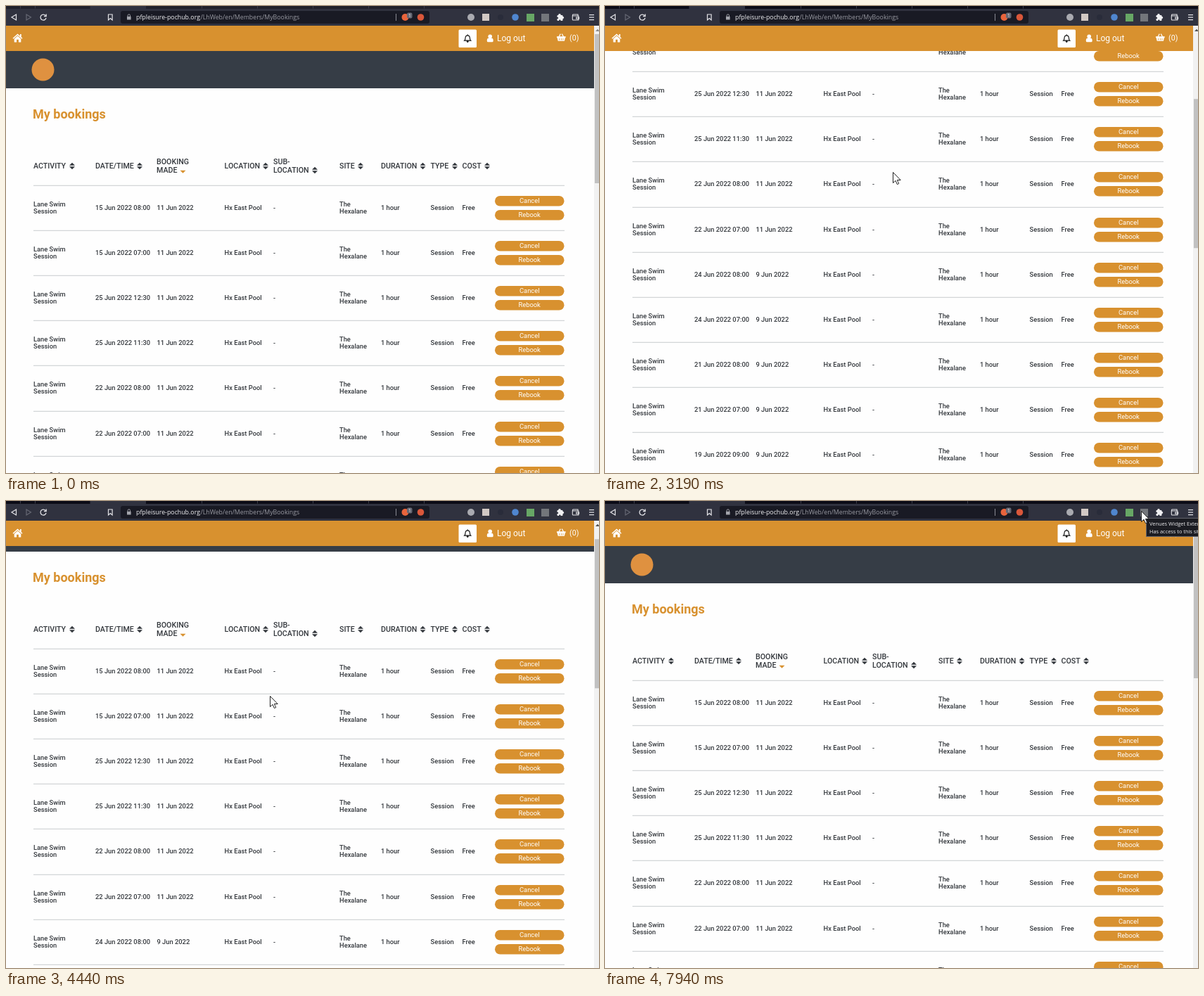
These frames come from a looping animation (843 px wide and 664 px high, 8 s). An HTML page with a canvas:

```html
<!DOCTYPE html>
<html lang="en">
<head>
<meta charset="utf-8">
<title>My bookings</title>
<style>
html, body { margin: 0; width: 843px; height: 664px; overflow: hidden; }
canvas { display: block; }
</style>
</head>
<body>
<canvas id="stage" width="843" height="664"></canvas>
<script>
const ctx = document.getElementById('stage').getContext('2d');
const LOOP = 8000, W = 843, H = 664, PAGE_W = 836;
const ORANGE = '#d8912f', INK = '#33373c', WHITE = '#fff';
const BODY = '500 9.33px Roboto, sans-serif';
const HEAD = '500 10.67px Roboto, sans-serif';

// time, pointer x, pointer y, scroll offset
const KEYS = [
  [310, 838, 655, 0], [620, 690, 330, 0], [930, 598, 141, 0], [1130, 598, 141, 0],
  [1500, 480, 115, 0], [1870, 404, 145, 0], [2020, 410, 180, 0], [2090, 410, 180, 0],
  [2700, 413, 229, 184], [2765, 413, 229, 184], [2775, 413, 230, 190], [2930, 413, 230, 190],
  [3190, 409, 236, 290], [3255, 409, 236, 290], [3500, 405, 260, 330], [3690, 402, 280, 300],
  [4090, 397, 306, 164], [4155, 397, 306, 164], [4510, 370, 270, 16], [4800, 330, 220, 0],
  [5350, 262, 133, 0], [5630, 400, 156, 0], [5695, 400, 156, 0], [6120, 629, 150, 0],
  [6520, 629, 150, 0], [6900, 805, 80, 0], [7060, 823, 28, 0], [7180, 795, 8, 0],
  [7270, 764, 15, 0], [7410, 762, 14, 0]
];
const FOCUS_AT = 1200, TOOLTIP_AT = 7940;

const SLOTS = ['15 Jun 2022 08:00', '15 Jun 2022 07:00', '25 Jun 2022 12:30', '25 Jun 2022 11:30',
  '22 Jun 2022 08:00', '22 Jun 2022 07:00', '24 Jun 2022 08:00', '24 Jun 2022 07:00',
  '21 Jun 2022 08:00', '21 Jun 2022 07:00', '19 Jun 2022 09:00', '19 Jun 2022 08:00'];
const COLUMNS = [['ACTIVITY', 39, 94], ['DATE/TIME', 127, 190], ['LOCATION', 310.5, 369],
  ['SITE', 474, 504], ['DURATION', 533, 592.5], ['TYPE', 603.5, 638], ['COST', 648.5, 684]];

function stateAt(t) {
  const i = KEYS.findIndex(k => k[0] > t);
  if (i < 0) return KEYS[KEYS.length - 1].slice(1);
  if (i === 0) return KEYS[0].slice(1);
  const a = KEYS[i - 1], b = KEYS[i], u = (t - a[0]) / (b[0] - a[0]);
  return [1, 2, 3].map(n => Math.round(a[n] + (b[n] - a[n]) * u));
}

function rect(x, y, w, h, color) {
  ctx.fillStyle = color;
  ctx.fillRect(x, y, w, h);
}
function pill(x, y, w, h, r, color) {
  ctx.fillStyle = color;
  ctx.beginPath();
  ctx.roundRect(x, y, w, h, r);
  ctx.fill();
}
function disc(x, y, r, color) {
  ctx.fillStyle = color;
  ctx.beginPath();
  ctx.arc(x, y, r, 0, Math.PI * 2);
  ctx.fill();
}
function text(s, x, y, font, color, align = 'left') {
  ctx.font = font;
  ctx.fillStyle = color;
  ctx.textAlign = align;
  ctx.fillText(s, x, y);
}
function shape(d, x, y, fill, stroke, width = 1.2) {
  const path = new Path2D(d);
  ctx.save();
  ctx.translate(x, y);
  if (fill) { ctx.fillStyle = fill; ctx.fill(path); }
  if (stroke) { ctx.strokeStyle = stroke; ctx.lineWidth = width; ctx.stroke(path); }
  ctx.restore();
}

const sortUp = (x, y) => shape('M-4 -.8 L0 -4.8 L4 -.8Z', x, y, INK);
const sortDown = (x, y, color) => shape('M-4 .8 L0 4.8 L4 .8Z', x, y, color);
function sortMark(x, y) {
  sortUp(x, y);
  sortDown(x, y, INK);
}

function drawHeadings() {
  for (const [label, x, mark] of COLUMNS) {
    text(label, x, 231, HEAD, INK);
    sortMark(mark, 227.5);
  }
  text('BOOKING', 214, 224.5, HEAD, INK);
  text('MADE', 214, 237, HEAD, INK);
  sortDown(251.5, 233, ORANGE);
  text('SUB-', 380, 224.5, HEAD, INK);
  text('LOCATION', 380, 237, HEAD, INK);
  sortMark(439, 233.5);
}

function drawButton(label, y) {
  pill(695, y, 98.5, 14.5, 7.25, ORANGE);
  text(label, 744.2, y + 10, '9.33px Roboto, sans-serif', WHITE, 'center');
}

function drawRow(slot, i) {
  const y = Math.round(255 + i * 64.12);
  const cell = (s, x, dy = 35) => text(s, x, y + dy, BODY, INK);
  rect(39, y - 0.3, 755, 1.3, '#d3d6d8');
  cell('Lane Swim', 39, 29.5);
  cell('Session', 39, 40);
  cell(slot, 127);
  cell(i < 6 ? '11 Jun 2022' : '9 Jun 2022', 214.5);
  cell('Hx East Pool', 310.5);
  cell('-', 380);
  cell('The', 474, 29.5);
  cell('Hexalane', 474, 40);
  cell('1 hour', 533);
  cell('Session', 603.5);
  cell('Free', 648.5);
  drawButton('Cancel', y + 15);
  drawButton('Rebook', y + 35);
}

function drawPage(scroll) {
  ctx.save();
  ctx.translate(0, -scroll);
  rect(0, 64, PAGE_W, 53, '#363d46');
  disc(52.5, 90.5, 16, '#df9140');
  text('My bookings', 38, 159.5, '700 18px Roboto, sans-serif', ORANGE);
  drawHeadings();
  SLOTS.forEach(drawRow);
  ctx.restore();
}

function drawSiteBar() {
  rect(0, 28, PAGE_W, 36, ORANGE);
  shape('M0 -6.5 L7 -.3 L6 .7 L0 -4.5 L-6 .7 L-7 -.3Z M3.4 -6 H5.2 V-2 L3.4 -3.6Z ' +
    'M0 -3.4 L4.8 .8 V5.5 H1.4 V1.8 H-1.4 V5.5 H-4.8 V.8Z', 16.5, 46, WHITE);
  pill(643.5, 33.5, 25.5, 25.5, 1.5, WHITE);
  shape('M-4.5 3.2 C-3 1.8 -3.4 -.2 -3 -1.8 C-2.6 -3.6 -1.5 -4.2 0 -4.4 ' +
    'C1.5 -4.2 2.6 -3.6 3 -1.8 C3.4 -.2 3 1.8 4.5 3.2Z M0 -4.4 V-5.6', 656.2, 46, null, '#111');
  disc(656.2, 50.5, 1.4, '#111');
  disc(688.2, 43.2, 2.8, WHITE);
  pill(683.8, 45.6, 8.8, 5.6, [3, 3, 1.5, 1.5], WHITE);
  text('Log out', 698, 50.3, '12px Roboto, sans-serif', WHITE);
  shape('M-3.5 -.5 L-1 -5.2 M3.5 -.5 L1 -5.2', 789.3, 44.8, null, WHITE);
  shape('M-6.3 -1.5 H6.3 V.5 H5.6 L4.6 5 H-4.6 L-5.6 .5 H-6.3Z', 789.3, 44.8, WHITE);
  for (const dx of [-2.6, 0, 2.6]) rect(788.9 + dx, 46, 0.8, 2.6, ORANGE);
  text('(0)', 801, 48.6, '10.67px Roboto, sans-serif', WHITE);
}

function drawScrollbar(scroll) {
  rect(PAGE_W, 28, 7, H - 28, '#f1f1f1');
  shape('M-3 1.5 L0 -1.7 L3 1.5Z', 841, 34.5, scroll ? '#505050' : '#8b8b8b');
  rect(837, 40 + scroll * 0.318, 6, 212, '#c1c1c1');
}

function drawTabs(focused) {
  const strip = focused ? '#0b0b16' : '#20212b';
  rect(0, 0, 119.5, 4, strip);
  rect(199, 0, W - 199, 4, strip);
  for (const x of [20, 41, 278, 357, 436, 515, 594]) rect(x, 0, 1, 3.5, '#3b3c49');
}

function drawBrowserBar(focused) {
  const url = '8.8px "Open Sans", sans-serif';
  rect(0, 0, W, 28, '#30323f');
  drawTabs(focused);
  shape('M3 -4 V4 L-3.5 0Z', 11.5, 16, null, '#e4e4e8');
  shape('M-3 -4 V4 L3.5 0Z', 32, 16, null, '#666874');
  shape('M3.2 -2.4 A4 4 0 1 0 4 .8 M4.2 -4.6 V-1.4 H1', 53, 16, null, '#e4e4e8', 1.3);
  shape('M-2.8 -4 H2.8 V4 L0 1.6 L-2.8 4Z', 148.3, 16, null, '#e4e4e8');
  pill(163, 7, 439, 18, 3, '#191a24');
  rect(172, 15, 5.6, 4.5, '#a4a5ac');
  shape('M-1.7 0 V-1.4 A1.7 1.7 0 0 1 1.7 -1.4 V0', 174.8, 15, null, '#a4a5ac', 1);
  text('pfpleisure-pochub.org', 185, 19.2, url, '#f2f2f4');
  text('/LhWeb/en/Members/MyBookings', 276.5, 19.2, url, '#9a9ba3');
  rect(554, 11, 1, 10, '#8a8b93');
  disc(567.5, 16, 5, '#e8643c');
  pill(570, 9.5, 7.5, 8, 2, '#666874');
  text('1', 573.8, 16, '6.5px "Open Sans", sans-serif', WHITE, 'center');
  disc(589.5, 16, 4.8, '#d9573a');
  disc(661, 16, 5, '#a9aab0');
  rect(677, 11, 10, 10, '#d2c9c4');
  disc(703, 16, 4, '#292c3a');
  disc(724, 16, 4.8, '#4f86cf');
  rect(740, 11, 11, 11, '#67a765');
  rect(761, 11, 11, 11, '#73767b');
  pill(783.5, 13, 8, 8, 1, '#f0f0f2');
  disc(787, 12.7, 1.8, '#f0f0f2');
  disc(791.3, 16.5, 1.8, '#f0f0f2');
  disc(783.9, 17, 1.2, '#30323f');
  disc(787.3, 20.6, 1.2, '#30323f');
  shape('M-4.5 -2.5 V3 Q-4.5 4 -3.5 4 H4 V-2 H-3.8 Q-5 -3.8 -3.4 -4 H3.2 V-2 M4.8 0 H1 V2.3 H4.8Z',
    809.8, 16, null, '#e4e4e8', 1.1);
  for (const y of [12, 15.5, 19]) rect(829, y, 7, 1.2, '#e4e4e8');
}

function drawPointer(x, y) {
  shape('M.5 .5 V15.6 L4 12.3 L6.4 17.6 L8.7 16.6 L6.4 11.5 H11.2Z', x, y, WHITE, '#222', 1);
}

function drawTooltip() {
  const font = '7.4px "Open Sans", sans-serif';
  rect(769, 24, 74, 27, '#62636a');
  rect(770, 25, 73, 25, '#1b1c22');
  text('Venues Widget Extension', 774, 35.2, font, '#ececee');
  text('Has access to this site', 774, 46, font, '#ececee');
}

function draw(t) {
  const [x, y, scroll] = stateAt(t);
  rect(0, 0, W, H, '#fefefe');
  drawPage(scroll);
  drawSiteBar();
  drawScrollbar(scroll);
  drawBrowserBar(t >= FOCUS_AT);
  if (t >= TOOLTIP_AT) drawTooltip();
  if (t >= KEYS[0][0]) drawPointer(x, y);
}

const start = performance.now();
function tick() {
  draw((performance.now() - start) % LOOP);
  requestAnimationFrame(tick);
}
tick();
</script>
</body>
</html>
```
